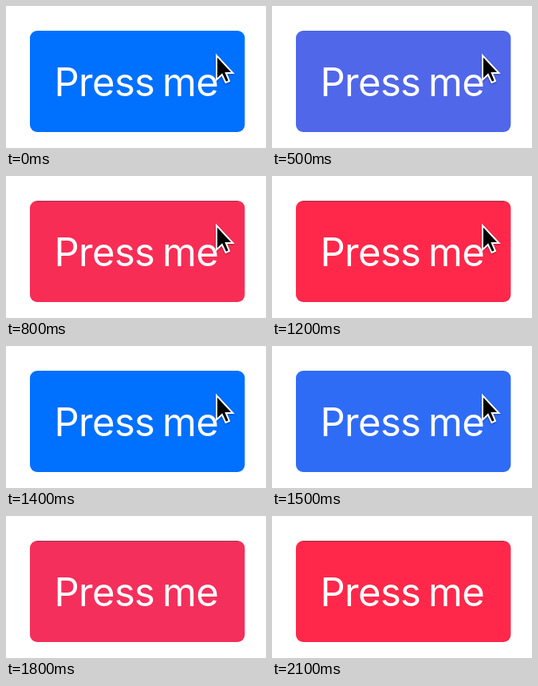
Write an HTML page that moves like this. It is 326x178 px and loops after 2.7 s.

```html
<!DOCTYPE html>
<html lang="en">
<head>
<meta charset="utf-8">
<style>
  html, body { margin: 0; width: 100%; height: 100%; overflow: hidden; background: #fff; }
  svg { display: block; width: 326px; height: 178px; }
  text {
    font: 400 49px Inter, "Liberation Sans", sans-serif;
    letter-spacing: -0.7px; word-spacing: -3.2px; fill: #fff;
  }
  #cursor { filter: drop-shadow(0 1px 1px rgba(0, 0, 0, .35)); }
</style>
</head>
<body>
<svg viewBox="0 0 326 178">
  <rect id="button" x="30" y="31" width="269.4" height="127" rx="9"/>
  <path id="edge" d="M38 31.5H291" stroke="#603848"/>
  <text x="60.5" y="113">Press me</text>
  <path id="cursor" d="M264 62V92.5L270.8 86L275.5 96L280 94L275.8 84H284.5Z"
        fill="#000" stroke="#fff" stroke-width="2"/>
</svg>
<script>
const LOOP = 2700, FADE = 500, STEP = 100, GAMMA = 1.6;
const BLUE = [0, 112, 255], RED = [255, 40, 74];
const [button, edge, cursor] = ["button", "edge", "cursor"].map(id => document.getElementById(id));

// cubic-bezier(.25, .1, .25, 1), solved for x by bisection
function ease(x) {
  if (x <= 0 || x >= 1) return x <= 0 ? 0 : 1;
  const bezier = (s, a, b) => 3 * s * (1 - s) ** 2 * a + 3 * s * s * (1 - s) * b + s ** 3;
  let lo = 0, hi = 1;
  for (let i = 0; i < 24; i++) {
    const mid = (lo + hi) / 2;
    if (bezier(mid, .25, .25) < x) lo = mid; else hi = mid;
  }
  return bezier(lo, .1, 1);
}

// Blends light intensities, so the purple in between stays bright
const mix = (a, b, p) => Math.round((a ** GAMMA * (1 - p) + b ** GAMMA * p) ** (1 / GAMMA));

function draw(now) {
  const t = Math.floor((now % LOOP) / STEP) * STEP;
  // The second press resets the button to blue and fades again
  const start = t < 1400 ? 432 : 1460;
  const p = ease((t - start) / FADE);
  button.setAttribute("fill", `rgb(${BLUE.map((c, i) => mix(c, RED[i], p))})`);
  edge.setAttribute("opacity", p * .6);
  cursor.setAttribute("visibility", t < 1800 ? "visible" : "hidden");
}

const origin = performance.now();
function tick() {
  draw(performance.now() - origin);
  requestAnimationFrame(tick);
}
tick();
</script>
</body>
</html>
```
